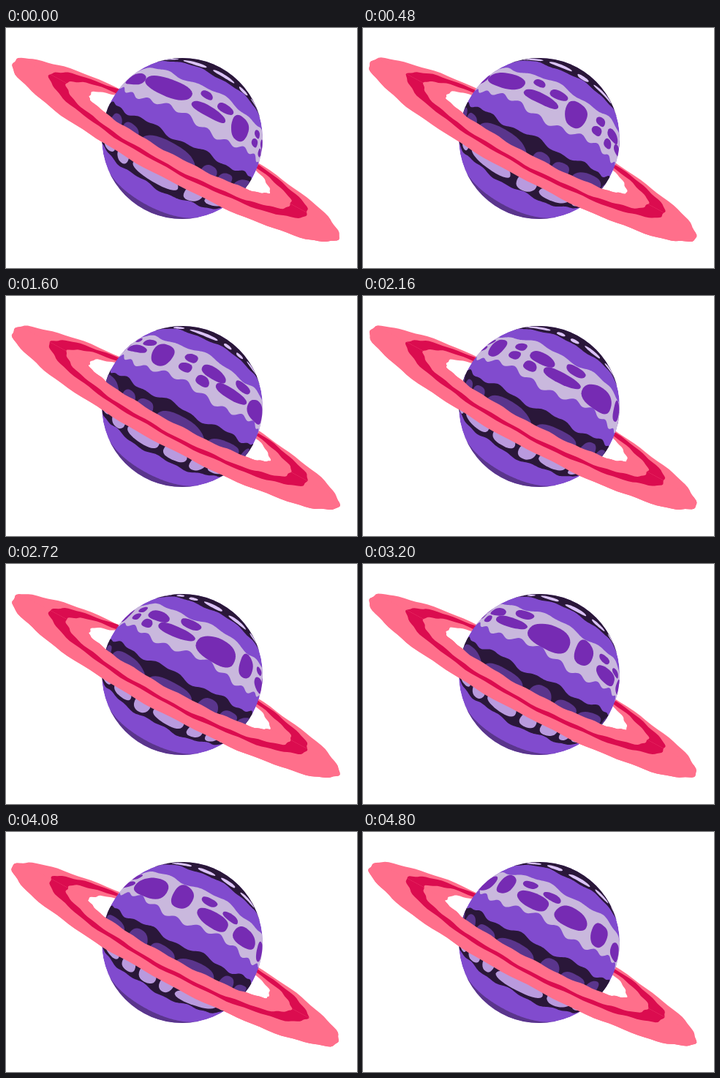
An HTML page with a canvas for the animation above (4880 ms loop, 480 px wide and 328 px high).

```html
<!DOCTYPE html>
<html lang="en">
<head>
<meta charset="utf-8">
<title>Ringed planet</title>
<style>
  html, body { margin: 0; width: 100%; height: 100%; overflow: hidden; background: #fff; }
  canvas { display: block; width: 480px; height: 328px; }
</style>
</head>
<body>
<canvas id="stage" width="480" height="328"></canvas>
<script>
const ctx = document.getElementById('stage').getContext('2d');
const LOOP = 4880, STEP = 80, SPEED = 0.00077;
const PLANET = { x: 241, y: 151, r: 110, tilt: 28 * Math.PI / 180 };
const RING = { x: 232, y: 167, tilt: 28.3 * Math.PI / 180 };
const COLOR = {
  pink: '#ff6f8b', red: '#db0c4f', body: '#814bce', light: '#c9b8dd', spot: '#762bb3',
  dark: '#2a1739', mid: '#5a358c', low: '#b99ade', cap: '#dbc3f8'
};

const rotate = (o, u, w) => {
  const c = Math.cos(o.tilt), s = Math.sin(o.tilt);
  return [o.x + c * u - s * w, o.y + s * u + c * w];
};

// Surface sheet, in radians -> stage; the sheet slides left and bulges over the globe
function project(p, q, turn) {
  p -= turn;
  const a = Math.hypot(p, q) || 1e-6;
  const k = PLANET.r * (a < Math.PI / 2 ? Math.sin(a) : 1.02) / a;
  return rotate(PLANET, p * k, q * k);
}

function polygon(pts, color) {
  ctx.beginPath();
  pts.forEach(p => ctx.lineTo(...p));
  ctx.closePath();
  ctx.fillStyle = color;
  ctx.fill();
}

// Uneven edge of a cloud band around latitude q
const wave = (q, amp, freq, phase) => p =>
  q + amp * (Math.sin(freq * p + phase) + 0.6 * Math.sin(2.3 * freq * p + 2 * phase));

const edges = {
  cap: wave(-1.08, 0.02, 7, 1),
  lightTop: wave(-0.77, 0.03, 6, 3.6),
  lightEnd: p => -0.26 - 0.03 * Math.cos(21 * (p + 0.07)) + 0.035 * Math.sin(5 * (p - 0.07)),
  darkTop: wave(0.03, 0.025, 8, 2.2),
  darkEnd: wave(0.77, 0.02, 8, 0.5)
};

// Blobs laid end to end along one latitude
function row(q, h, gap, widths) {
  let p = -1.15;
  return widths.map((w, i) => {
    const b = [p + w / 2, q + 0.012 * Math.sin(i * 2.4), w / 2, h];
    p += w + gap;
    return b;
  });
}

const capRow = row(-1.19, 0.055, 0.1,
  [0.45, 0.42, 0.4, 0.23, 0.5, 0.15, 0.15, 0.35, 0.4, 0.3, 0.3, 0.4, 0.35, 0.4]);
const midRow = row(0.27, 0.15, 0.03,
  [0.3, 0.3, 0.85, 0.26, 0.25, 0.75, 0.65, 0.35, 0.35, 0.6, 0.3, 0.4, 0.3]);
const lowRow = row(0.61, 0.11, 0.06,
  [0.35, 0.22, 0.75, 0.3, 0.5, 0.35, 0.25, 0.45, 0.25, 0.25, 0.2, 0.7, 0.4, 0.4]);

// Storm spots: along, across, half length, half height
const spots = [
  [-1.15, -0.5, 0.25, 0.14], [-0.52, -0.53, 0.37, 0.15], [0.02, -0.67, 0.09, 0.06],
  [0.33, -0.63, 0.13, 0.07], [0.14, -0.47, 0.25, 0.08], [0.65, -0.51, 0.17, 0.18],
  [1.04, -0.63, 0.09, 0.07], [1.03, -0.47, 0.09, 0.07], [1.4, -0.58, 0.19, 0.09],
  [1.31, -0.41, 0.1, 0.07], [1.88, -0.65, 0.16, 0.07], [1.75, -0.46, 0.28, 0.08],
  [2.36, -0.49, 0.29, 0.19], [2.86, -0.54, 0.14, 0.19], [3.21, -0.65, 0.12, 0.06],
  [3.57, -0.61, 0.13, 0.06], [3.36, -0.45, 0.25, 0.11], [3.92, -0.48, 0.25, 0.14],
  [4.4, -0.49, 0.15, 0.19], [4.9, -0.45, 0.2, 0.15]
];

function blob([p, q, rx, ry], turn, color) {
  if (Math.abs(p - turn) > 2) return;
  const round = v => Math.sign(v) * Math.abs(v) ** 0.85;
  const pts = [];
  for (let i = 0; i < 36; i++) {
    const a = i * Math.PI / 18;
    const k = 0.96 + 0.05 * Math.sin(2 * a + 9 * p) + 0.04 * Math.sin(3 * a + 5 * p);
    pts.push(project(p + rx * k * round(Math.cos(a)), q + ry * k * round(Math.sin(a)), turn));
  }
  polygon(pts, color);
}

function band(top, end, turn, color) {
  const a = [], b = [];
  for (let d = -1.6; d <= 1.6; d += 0.02) {
    const p = d + turn;
    a.push(project(p, top(p), turn));
    b.unshift(project(p, end(p), turn));
  }
  polygon(a.concat(b), color);
}

function planet(turn) {
  const row = (list, color) => list.forEach(b => blob(b, turn, color));
  ctx.save();
  ctx.beginPath();
  ctx.arc(PLANET.x, PLANET.y, PLANET.r, 0, 2 * Math.PI);
  ctx.clip();
  ctx.fillStyle = COLOR.body;
  ctx.fill();
  band(() => 1.21, () => 1.6, turn, COLOR.mid);
  band(() => -1.6, edges.cap, turn, COLOR.dark);
  row(capRow, COLOR.cap);
  band(edges.lightTop, edges.lightEnd, turn, COLOR.light);
  row(spots, COLOR.spot);
  band(edges.darkTop, edges.darkEnd, turn, COLOR.dark);
  row(midRow, COLOR.mid);
  row(lowRow, COLOR.low);
  ctx.restore();
}

// Oval with its own upper and lower half heights and a hand-cut edge that drifts
function oval(path, t, length, shift, up, down) {
  for (let i = 0; i < 120; i++) {
    const a = i * Math.PI / 60, s = Math.sin(a), turn = 2 * Math.PI * t / LOOP;
    const rough = 0.6 * Math.sin(11 * a + 9 * turn + length) + 0.5 * Math.sin(23 * a - 14 * turn);
    const u = (length + 2 * rough) * Math.cos(a);
    const w = shift + (s < 0 ? up : down) * s + rough * s;
    path.lineTo(...rotate(RING, u, w));
  }
  path.closePath();
}

function ring(t) {
  const disc = (color, outer, inner) => {
    const path = new Path2D();
    for (const size of [outer, inner]) {
      const loop = new Path2D();
      oval(loop, t, ...size);
      path.addPath(loop);
    }
    ctx.fillStyle = color;
    ctx.fill(path, 'evenodd');
  };
  disc(COLOR.pink, [253, 0, 42, 41], [140, -10, 28, 17]);
  disc(COLOR.red, [200, -9, 32, 36], [174, -9, 28, 31]);
}

function draw(t) {
  ctx.fillStyle = '#fff';
  ctx.fillRect(0, 0, 480, 328);
  ring(t);
  planet(t * SPEED);
  // Near half of the ring
  ctx.save();
  ctx.beginPath();
  for (const [u, w] of [[-300, -10], [300, -10], [300, 100], [-300, 100]]) {
    ctx.lineTo(...rotate(RING, u, w));
  }
  ctx.clip();
  ring(t);
  ctx.restore();
}

function tick() {
  draw(Math.floor(performance.now() % LOOP / STEP) * STEP);
  requestAnimationFrame(tick);
}
tick();
</script>
</body>
</html>
```
